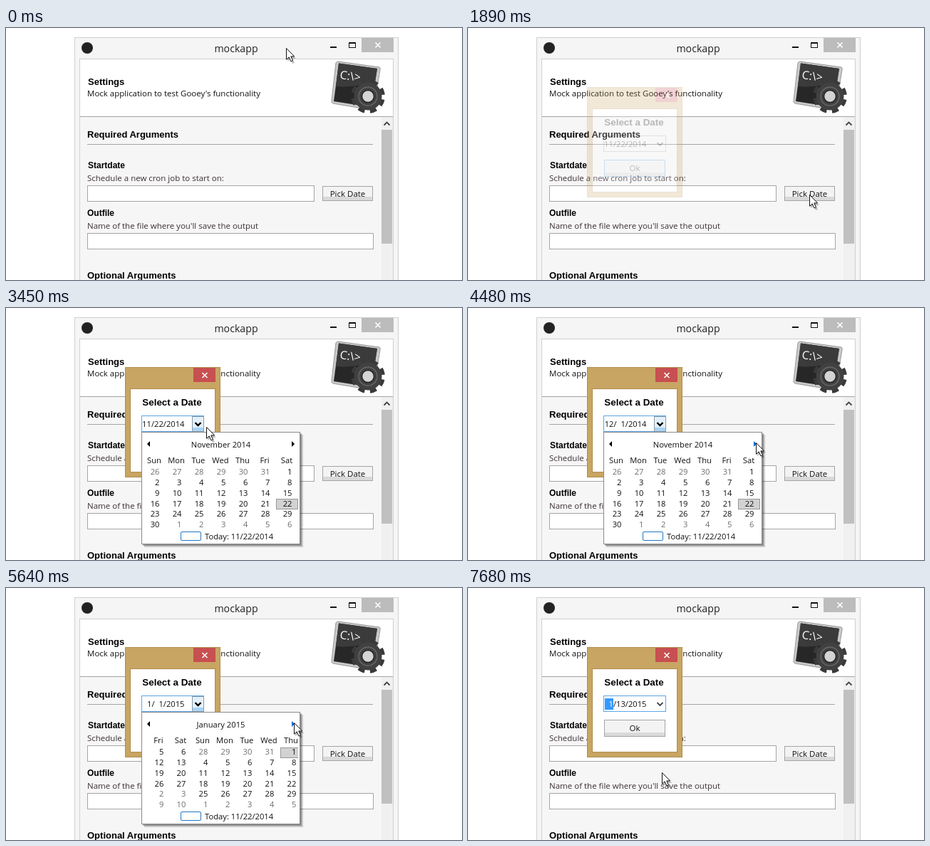
An HTML page that plays this animation: 640x354 px, repeating every 8000 ms.

```html
<!DOCTYPE html>
<html lang="en">
<head>
<meta charset="utf-8">
<title>mockapp</title>
<style>
  html, body { margin: 0; width: 100%; height: 100%; overflow: hidden; background: #fff; }
  svg { display: block; width: 640px; height: 354px; }
  text { font-family: "Open Sans", "Noto Sans", sans-serif; font-size: 11.5px; fill: #111; white-space: pre; }
  .title { font-size: 14.2px; fill: #222; }
  .bold { font-family: "Liberation Sans", Arial, sans-serif; font-weight: bold; font-size: 13px; fill: #000; }
  .label { font-size: 12px; }
  .hint { fill: #3c3038; }
  .cal, .cal text { font-size: 11.2px; }
  .mid { text-anchor: middle; }
  .end { text-anchor: end; }
  .cal .dim { fill: #6e6e6e; }
  .cal .hot { fill: #0066cc; }
</style>
</head>
<body>
<svg id="stage" viewBox="0 0 640 354"></svg>
<script>
const LOOP = 8000, STEP = 60;
const GOLD = '#c8a562', GOLD_EDGE = '#b18d4c', RED = '#c75050', BLUE = '#3c9be6', GREY = '#a5a5a5';

// Outlined box whose outer edges are x..x+w and y..y+h
const box = (x, y, w, h, fill, stroke, extra = '') =>
  `<rect x="${x + .5}" y="${y + .5}" width="${w - 1}" height="${h - 1}" fill="${fill}" stroke="${stroke}" ${extra}/>`;
const fill = (x, y, w, h, color, extra = '') =>
  `<rect x="${x}" y="${y}" width="${w}" height="${h}" fill="${color}" ${extra}/>`;
const text = (x, y, str, cls = '', extra = '') => `<text x="${x}" y="${y}" class="${cls}" ${extra}>${str}</text>`;
const line = (d, color, width = 1, extra = '') =>
  `<path d="${d}" fill="none" stroke="${color}" stroke-width="${width}" ${extra}/>`;
const cross = (x, y) => line(`M${x - 3.5} ${y - 3.5}l7 7m0-7l-7 7`, '#fff', 1.6);

const button = (id, x, y, w, h, label) =>
  box(x, y, w, h, '#f3f3f3', GREY, `id="${id}"`) +
  fill(x + 1, y + h - 6, w - 2, 5, '#d9d9d9', `id="${id}Strip"`) +
  text(x + w / 2, y + h / 2 + 4, label, 'mid');

const terminalIcon = `
  <path d="M466 47L524 55Q526 56 525 59L516 113Q515 116 512 115L459 106Q456 105 457 102L463 49Q464 47 466 47Z" fill="#c9c9c9" stroke="#9a9a9a"/>
  <path d="M467 49.5L521 57L512 111L460 103Z" fill="#272727"/>
  <path d="M467 49.5L521 57L518 76Q490 84 463 82Z" fill="#3b3b3b"/>
  <text transform="translate(468 71) rotate(8)" style="font-size:16px;fill:#fff">C:\\&gt;_</text>
  <circle cx="508" cy="96" r="20.5" fill="none" stroke="#3a3a3a" stroke-width="7" stroke-dasharray="8.8 7.3" transform="rotate(12 508 96)"/>
  <circle cx="508" cy="96" r="14" fill="none" stroke="#414141" stroke-width="11"/>
  <circle cx="508" cy="96" r="13" fill="none" stroke="#666" stroke-width="1.5"/>
  <circle cx="508" cy="96" r="8.5" fill="#d4d4d4" stroke="#222" stroke-width="1.5"/>`;

const mainWindow =
  box(96, 13, 455, 350, GOLD, GOLD_EDGE, 'id="frame"') +
  '<circle cx="114" cy="28" r="8" fill="#222"/>' +
  text(323, 34, 'mockapp', 'title mid') +
  fill(455, 26, 9, 2, '#111') + box(481, 20, 10, 8, 'none', '#111') + fill(481, 20, 10, 2, '#111') +
  fill(499, 14, 45, 20, RED, 'id="close"') + cross(522, 24) +
  box(103, 43, 441, 320, '#f6f6f6', GOLD_EDGE, 'id="inner"') +
  fill(104, 44, 439, 80, '#fff') + fill(104, 124, 439, 1, GREY) +
  text(115, 80, 'Settings', 'bold') +
  text(114, 96, "Mock application to test Gooey's functionality") +
  terminalIcon +
  fill(527, 125, 16, 229, '#f0f0f0') + fill(527, 143, 15, 160, '#c0c0c0') +
  line('M530.5 136.5l4-4 4 4', '#444', 1.8) +
  text(114, 154, 'Required Arguments', 'bold') + fill(114, 163, 401, 1, GREY) +
  text(115, 197, 'Startdate', 'bold label') +
  text(114, 215, 'Schedule a new cron job to start on:', 'hint') +
  box(114, 221, 319, 23, '#fff', GREY, 'id="startField"') +
  fill(120, 224, 1, 15, '#000', 'id="caret"') +
  button('pick', 444, 222, 71, 21, 'Pick Date') +
  text(114, 264, 'Outfile', 'bold label') +
  text(114, 282, "Name of the file where you'll save the output", 'hint') +
  box(114, 288, 402, 23, '#fff', GREY) +
  text(114, 352, 'Optional Arguments', 'bold');

const dialog =
  box(167, 83, 134, 155, GOLD, GOLD_EDGE) +
  fill(263, 84, 31, 20, RED) + cross(279, 94.5) +
  box(174, 113, 120, 118, '#fff', GOLD_EDGE) +
  text(233, 137, 'Select a Date', 'bold mid', 'style="font-size:13.4px"') +
  box(190, 151, 88, 23, '#fff', GREY, 'id="dateField"') +
  fill(192, 155, 12, 16, '#3399ff', 'id="monthMark"') +
  `<g class="cal">${text(250.5, 167, '', 'end', 'id="dateText"')}</g>` +
  `<g id="dropOpen">${box(261, 152, 17, 22, '#e3f0fb', '#8a9aa8')}${fill(262, 168, 15, 5, '#a9d3f5')}</g>` +
  line('M265.5 161l4 4 4-4', '#444', 1.8, 'id="chevron"') +
  button('ok', 191, 185, 86, 24, 'Ok');

const popup =
  fill(194, 178, 223, 158, '#000', 'opacity=".18"') + fill(192, 176, 223, 158, '#000', 'opacity=".3"') +
  box(190, 174, 223, 158, '#fff', '#8a8a8a') +
  '<path d="M202 187v8l-4-4z" fill="#000"/><path id="nextArrow" d="M401 187v8l4-4z"/>' +
  text(301.5, 196, '', 'mid', 'id="monthName"') +
  '<g clip-path="url(#gridClip)"><g id="pages"></g></g>' +
  box(245, 314, 29, 13, '#fff', '#1f78c8', 'rx="1.5"') +
  text(279, 325, 'Today: 11/22/2014');

const cursor =
  '<path d="M2 3V19l4-3 3 6 3-1-3-6h5z" fill="#000" opacity=".25"/>' +
  '<path d="M.5.5V16.3l3.7-3.4 2.7 6 2.6-1.1-2.7-5.9h4.9Z" fill="#fff" stroke="#111"/>';

document.getElementById('stage').innerHTML =
  '<defs><clipPath id="gridClip"><rect x="193" y="206" width="217" height="106"/></clipPath></defs>' +
  fill(0, 0, 640, 354, '#fff') + mainWindow +
  `<g id="dialog">${dialog}</g><g id="popup" class="cal">${popup}</g><g id="cursor">${cursor}</g>`;

const $ = id => document.getElementById(id);
const set = (id, attrs) => { for (const k in attrs) $(id).setAttribute(k, attrs[k]); };
const show = (id, on) => set(id, { visibility: on ? 'visible' : 'hidden' });

// Calendar pages lie side by side, one page width apart
const PAGE = 217, COL = 31, ROW = 14.85;
const months = [
  { name: 'November 2014', year: 2014, month: 10, selected: 22 },
  { name: 'December 2014', year: 2014, month: 11, selected: 1 },
  { name: 'January 2015', year: 2015, month: 0, selected: 1 }
];

function monthPage({ year, month, selected }, page) {
  const first = new Date(year, month, 1).getDay();
  let out = ['Sun', 'Mon', 'Tue', 'Wed', 'Thu', 'Fri', 'Sat']
    .map((day, i) => text(208 + COL * i, 218, day, 'mid')).join('');
  for (let i = 0; i < 42; i++) {
    const date = new Date(year, month, 1 - first + i), day = date.getDate();
    const x = 208 + COL * (i % 7), row = Math.floor(i / 7), inside = date.getMonth() === month;
    if (inside && day === selected)
      out += box(x - 15, Math.round(223.5 + ROW * row), 31, 15, '#d2d2d2', '#444', 'stroke-dasharray="1 1"');
    const id = page === 2 && inside && day === 13 ? 'id="hoverDay"' : '';
    out += text(x + 7.5, 234 + ROW * row, day, inside ? 'end' : 'end dim', id);
  }
  return `<g transform="translate(${page * PAGE})">${out}</g>`;
}
$('pages').innerHTML = months.map(monthPage).join('');

// Pointer legs: start time, steps, end point, optional bend point
const legs = [
  { t: 260, n: 14, to: [479, 234] },
  { t: 2190, n: 9, to: [268, 161] },
  { t: 3450, n: 1, to: [281, 167] },
  { t: 3510, n: 13, to: [407, 190], bend: [380, 323] },
  { t: 4300, n: 2, to: [404, 189] },
  { t: 6220, n: 13, to: [271, 259], bend: [325, 290] },
  { t: 7350, n: 1, to: [272, 259] }
];

function pointer(t) {
  let from = [393, 28];
  for (const { t: start, n, to, bend } of legs) {
    if (t < start) break;
    const p = Math.min(1, (Math.floor((t - start) / STEP) + 1) / n), e = p * p * (3 - 2 * p);
    const a = from;
    from = to.map((end, i) => {
      const c = bend ? bend[i] : (a[i] + end) / 2;
      return Math.round(a[i] * (1 - e) ** 2 + 2 * c * e * (1 - e) + end * e * e);
    });
  }
  return from;
}

const between = (t, a, b) => t >= a && t < b;
const slide = (t, start) =>
  t < start ? 0 : [0, .38, .687, .9, 1][Math.min(4, Math.floor((t - start) / STEP))];
const fade = (t, start, step, n) => t < start ? 0 : Math.min(1, (Math.floor((t - start) / step) + 1) / n);

function dateString(t) {
  const gap = '\u00a0\u00a0';
  if (t < 4480) return '11/22/2014';
  if (t < 5520) return `12/${gap}1/2014`;
  if (t < 7550) return `1/${gap}1/2015`;
  return t < 7680 ? '1/13/2015' : '<tspan fill="#fff">1</tspan>/13/2015';
}

function update(t) {
  const active = between(t, 440, 1890);
  const open = between(t, 2730, 7550);
  const edge = active ? GOLD_EDGE : '#cfcfcf';
  set('frame', { fill: active ? GOLD : '#f5f5f5', stroke: edge });
  set('inner', { stroke: edge });
  set('close', { fill: active ? RED : '#bcbcbc' });
  set('startField', { stroke: active ? BLUE : GREY });
  show('caret', between(t, 440, 970) || between(t, 1500, 1700));

  const pressed = between(t, 1700, 1890), hover = between(t, 980, 1890);
  set('pick', {
    fill: pressed ? '#cfe6fa' : hover ? '#f1f7fd' : '#f3f3f3',
    stroke: pressed ? '#569de5' : hover ? '#7eb4ea' : GREY
  });
  show('pickStrip', !hover);

  set('dialog', { opacity: fade(t, 1890, STEP, 4) });
  set('dateField', { stroke: t >= 2730 ? '#5aa7e6' : GREY });
  set('ok', { stroke: t < 2730 ? BLUE : GREY });
  $('dateText').innerHTML = dateString(t);
  set('monthMark', { opacity: t >= 7680 ? 1 : 0 });
  set('dropOpen', { opacity: open ? 1 : 0 });
  set('chevron', { stroke: open ? '#000' : '#444', 'stroke-width': open ? 2.4 : 1.8 });

  const page = slide(t, 4480) + slide(t, 5520);
  set('popup', { opacity: open ? fade(t, 2730, 95, 3) : 0 });
  set('pages', { transform: `translate(${-page * PAGE})` });
  set('nextArrow', { fill: between(t, 4230, 6280) ? '#0066cc' : '#000' });
  $('monthName').textContent = months[Math.round(page)].name;
  set('hoverDay', { class: t >= 6880 ? 'end hot' : 'end' });

  set('cursor', { transform: `translate(${pointer(t)})` });
}

function tick() {
  update(performance.now() % LOOP);
  requestAnimationFrame(tick);
}
tick();
</script>
</body>
</html>
```
